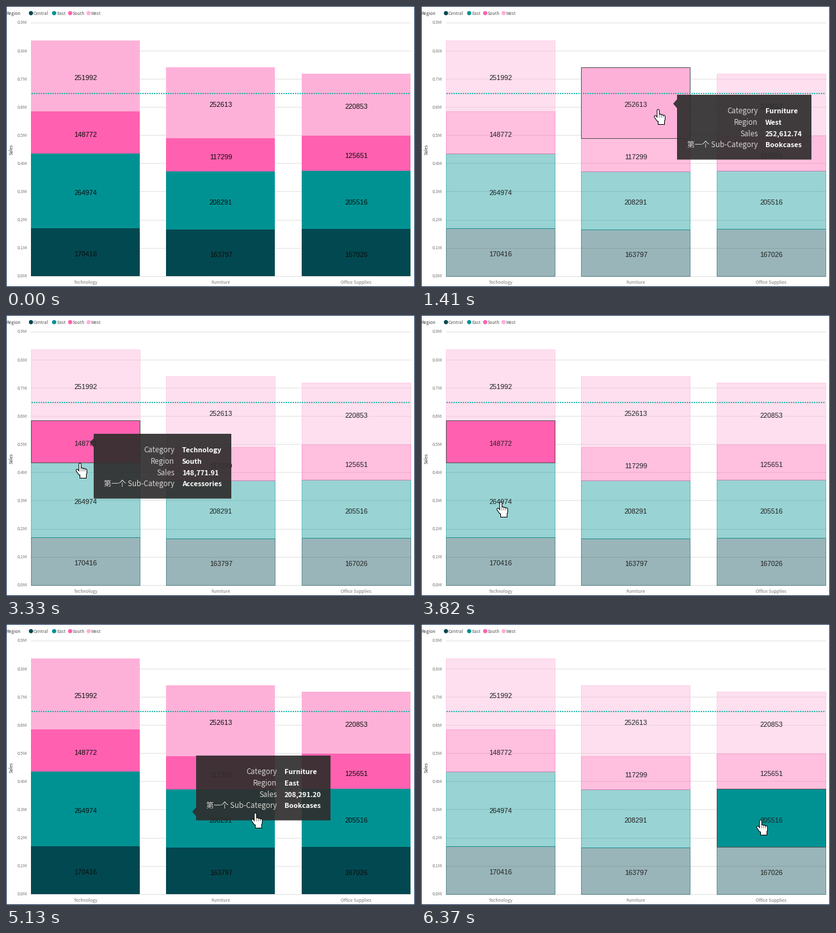
Write a matplotlib script that moves like this. It is 639 px wide and 440 px high and loops after 7030 ms.

```python
import numpy as np
import matplotlib.pyplot as plt
from matplotlib.animation import FuncAnimation
from matplotlib.colors import to_rgba
from matplotlib.patches import Circle, Polygon, Rectangle

W, H, DPI = 639, 440, 64
PT = 72 / DPI  # points per pixel
STEP, FRAMES = 37, 190

UI, NUM = "Noto Sans CJK JP", "Liberation Sans"
REGIONS = {"Central": "#024850", "East": "#009293", "South": "#ff61b0", "West": "#feb1d8"}
FIRST_SUB = {"Technology": "Accessories", "Furniture": "Bookcases",
             "Office Supplies": "Appliances"}
NAMES, COLORS = list(REGIONS), list(REGIONS.values())
CATEGORIES = list(FIRST_SUB)
SALES = [
    [170416, 264973.98, 148771.91, 251992],
    [163797, 208291.20, 117298.68, 252612.74],
    [167026, 205516.05, 125651, 220853],
]
BAR_X, BAR_STEP, BAR_W = 39, 211.3, 170
BASE, UNIT = 422.7, 44.08  # zero line, pixels per 0.1M

# start ms, (category, region) or None
SELECTION = [
    (0, None), (1280, (1, 3)), (2080, (1, 2)), (2910, (0, 2)),
    (4020, (0, 1)), (4710, None), (5690, (2, 1)),
]
# start ms, end ms, (category, region)
TIPS = [
    (1080, 1400, (1, 3)), (1400, 1700, (1, 3)), (2220, 2490, (1, 2)),
    (3050, 3450, (0, 2)), (4080, 4780, (0, 1)), (5100, 5340, (1, 1)),
    (5690, 6230, (2, 1)),
]
TIP_LAG = 260  # a tooltip opens where the pointer was this long ago
TIP_H = 101.5

# ms of arrival, ms of rest, x, y of the pointer's top left corner
STOPS = [
    (530, 0, 546, 214), (820, 0, 394, 181), (880, 730, 364, 161),
    (1960, 410, 348.5, 235), (2790, 330, 101, 208), (3330, 30, 109, 231),
    (3820, 0, 118, 292), (4420, 290, 125, 289), (4840, 0, 261, 302),
    (5110, 40, 383, 295), (5410, 0, 524, 306),
]
KEYS = np.array([(t + wait, x, y) for t, rest, x, y in STOPS for wait in (0, rest)])

fig = plt.figure(figsize=(W / DPI, H / DPI), dpi=DPI, facecolor="white")
ax = fig.add_axes([0, 0, 1, 1])
ax.set_xlim(0, W)
ax.set_ylim(H, 0)
ax.axis("off")


def text(x, y, s, px, color, font=UI, **kw):
    kw.setdefault("va", "baseline")
    return ax.text(x, y, s, fontsize=px * PT, color=color, family=font, **kw)


def level(value):
    return BASE - value / 1e5 * UNIT


def pointer_at(t):
    return np.array([np.interp(t, KEYS[:, 0], KEYS[:, k]) for k in (1, 2)])


def draw_axes():
    for k in range(10):
        y = level(k * 1e5)
        ax.plot([39, 632], [y, y], color="#e6e6e6", lw=1.2 * PT, zorder=1)
        text(33, y + 2.5, f"0.{k}M", 6.9, "#777777", ha="right")
    for c, name in enumerate(CATEGORIES):
        text(BAR_X + c * BAR_STEP + BAR_W / 2 + 0.5, 434.6, name, 6.9, "#777777",
             ha="center")
    text(8.5, 224.5, "Sales", 6.9, "#333333", rotation=90, ha="center", va="center")
    text(0.5, 13.6, "Region", 6.9, "#444444")
    x = 39
    for name, color in REGIONS.items():
        ax.add_patch(Circle((x, 11.2), 3.3, fc=color, lw=0))
        text(x + 3.7, 13.6, name, 6.9, "#555555")
        x += 10 + 3.75 * len(name)
    y = level(650000) + 0.8
    ax.plot([40, 632], [y, y], color="#12b0a4", lw=1.9 * PT, ls=(0, (1, 0.9)),
            dash_capstyle="butt", zorder=4)
    ax.add_patch(Rectangle((0.5, 0.5), W - 1, H - 1, fill=False, ec="#142c50",
                           lw=PT, zorder=20, snap=False))


def draw_bars():
    bars, labels = {}, []
    for c, values in enumerate(SALES):
        x = BAR_X + c * BAR_STEP
        edges = level(np.cumsum([0] + values))
        for r, (low, high) in enumerate(zip(edges, edges[1:])):
            bars[c, r] = ax.add_patch(Rectangle((x, high), BAR_W, low - high))
            labels.append(text(x + BAR_W / 2 + 0.5, (low + high) / 2 + 6.8,
                               f"{values[r]:.0f}", 10.7, "black", NUM,
                               ha="center", zorder=5))
    return bars, labels


def make_tip(anchor, c, r):
    x, y = pointer_at(anchor) + (30, -8)
    left, top = x + 6, y - (14 if y < H / 2 else 88)
    sub = FIRST_SUB[CATEGORIES[c]]
    right, bottom = left + 187.5 + 2.5 * len(sub), top + TIP_H
    outline = [(left, top), (right, top), (right, bottom), (left, bottom),
               (left, y + 7), (x, y), (left, y - 7)]
    parts = [ax.add_patch(Polygon(outline, fc="#2f2d2d", alpha=0.92, lw=0, zorder=8))]
    rows = {"Category": CATEGORIES[c], "Region": NAMES[r],
            "Sales": f"{SALES[c][r]:,.2f}", "第一个 Sub-Category": sub}
    for k, (name, value) in enumerate(rows.items()):
        line = top + 29.4 + 17.6 * k
        parts.append(text(left + 126.5, line, name, 11.5, "#d2d0ce",
                          ha="right", zorder=9))
        parts.append(text(left + 138, line, value, 10.8, "white",
                          weight="bold", zorder=9))
    return parts


def hand_shape():
    """Fingers and thumb as strokes parted by gaps, and a square palm."""
    gap = (np.nan, np.nan)
    strokes = [(2.2, 12.3), (6.2, 18), gap]
    for k in range(4):
        x, tip = 6.6 + 3 * k, 9 + 0.9 * k if k else 2.6
        strokes += [(x, tip), (x, 17), gap]
    return np.array(strokes), np.array([(10.6, 18), (10.6, 18.6)])


def make_hand():
    parts = []
    for color, grow in (("black", 2), ("white", 0)):
        for shape, width, cap in zip(hand_shape(), (2.5, 9), ("round", "projecting")):
            line, = ax.plot([], [], color=color, lw=(width + grow) * PT,
                            solid_capstyle=cap, zorder=12)
            parts.append((line, shape))
    return parts


def place_hand(t):
    corner = pointer_at(t)
    for line, shape in hand:
        line.set_data(*(shape + corner).T)
        line.set_visible(t >= KEYS[0, 0])


def paint_bars(selected):
    for key, bar in bars.items():
        color = COLORS[key[1]]
        if selected is None:
            bar.set(facecolor=color, edgecolor="none", linewidth=0, zorder=2)
        elif key == selected:
            bar.set(facecolor=color, edgecolor="#555555", linewidth=PT, zorder=3)
        else:
            bar.set(facecolor=to_rgba(color, 0.4), edgecolor=to_rgba(color, 0.5),
                    linewidth=PT, zorder=2)
    for label in labels:
        label.set_color("#0c0c0c" if selected is None else "#202020")


draw_axes()
bars, labels = draw_bars()
tips = [(start, end, make_tip(start - TIP_LAG, *key)) for start, end, key in TIPS]
hand = make_hand()


def update(i):
    t = (i + 0.5) * STEP
    paint_bars([state for start, state in SELECTION if start <= t][-1])
    for start, end, parts in tips:
        for part in parts:
            part.set_visible(start <= t < end)
    place_hand(t)
    return []


anim = FuncAnimation(fig, update, frames=FRAMES, interval=STEP, repeat=True,
                     repeat_delay=0, blit=False, cache_frame_data=False)
plt.show()
```
